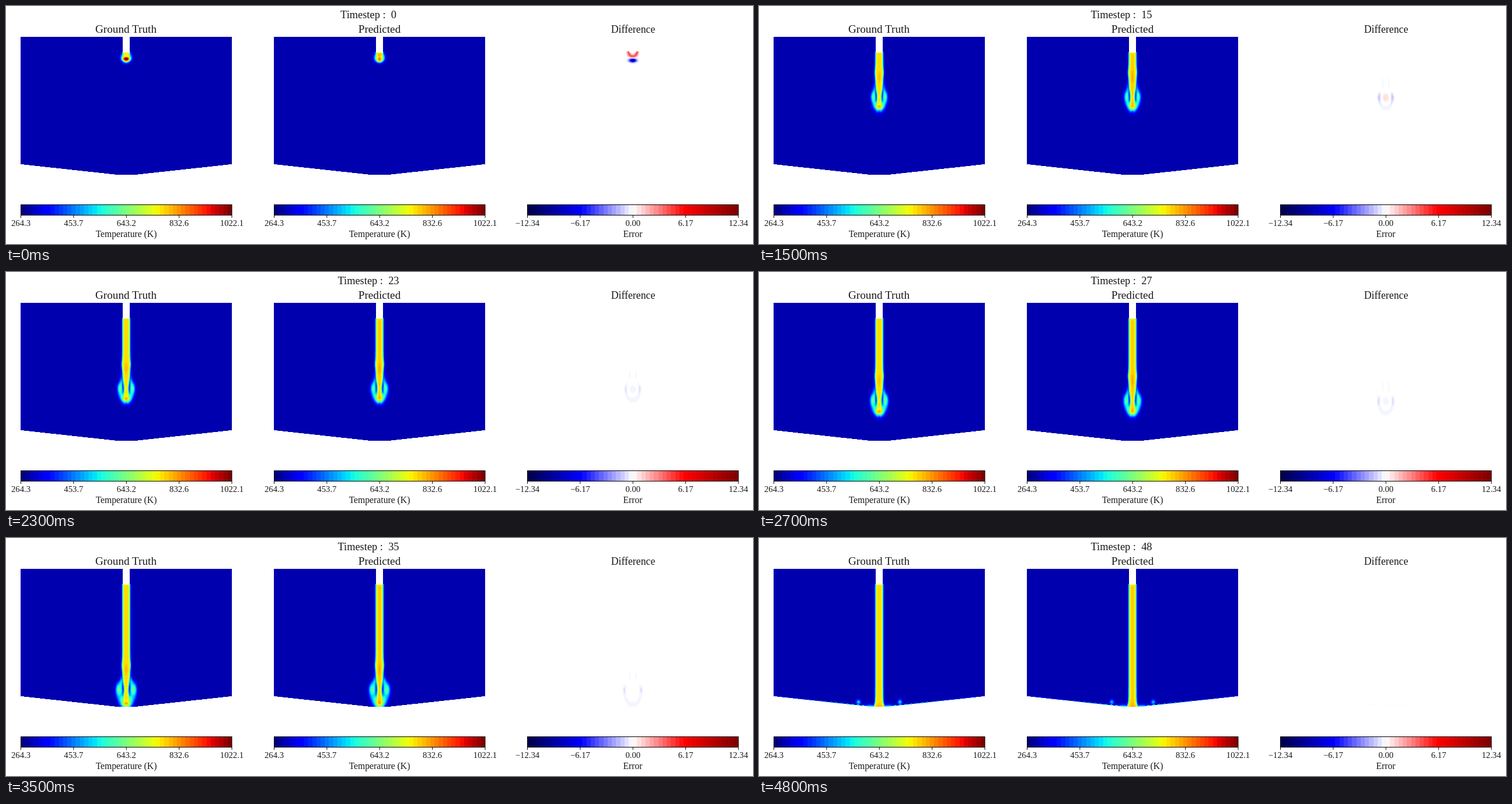
Animation, 1280 px wide and 409 px high, one loop 4.9 s. Source, as an HTML page with a canvas:

```html
<!DOCTYPE html>
<html lang="en">
<head>
<meta charset="utf-8">
<title>Jet temperature prediction</title>
<style>
  html, body { margin: 0; width: 100%; height: 100%; overflow: hidden; background: #fff; }
  canvas, svg { position: absolute; left: 0; top: 0; }
  text { font-family: "Liberation Serif", serif; text-anchor: middle; fill: #1a1a1a; }
</style>
</head>
<body>
<canvas id="stage" width="1280" height="409"></canvas>
<svg id="labels" width="1280" height="409"></svg>
<script>
const ctx = document.getElementById('stage').getContext('2d');
const labels = document.getElementById('labels');
const STEPS = 49, STEP_MS = 100, LEVELS = 50;
const TOP = 53, HALF = 181, HEIGHT = 238, AMBIENT = 0.045;

const clamp = v => Math.min(1, Math.max(0, v));
const sigmoid = v => 1 / (1 + Math.exp(-v));
const bell = (a, b = 0) => Math.exp(-a * a - b * b);
const floorAt = dx => Math.min(290, 290.5 - (dx - 6) * 19 / 174);

// Colour maps, resampled to a fixed number of levels
const jet = t => [
  Math.min((t - 0.35) / 0.31, 1 - (t - 0.89) / 0.22),
  Math.min((t - 0.125) / 0.25, (0.91 - t) / 0.27),
  Math.min(0.5 + t / 0.22, (0.65 - t) / 0.31),
];
function seismic(t) {
  if (t < 0.25) return [0, 0, 0.3 + 2.8 * t];
  if (t < 0.5) return [4 * t - 1, 4 * t - 1, 1];
  if (t < 0.75) return [1, 3 - 4 * t, 3 - 4 * t];
  return [2.5 - 2 * t, 0, 0];
}
const palette = map => Array.from({ length: LEVELS },
  (_, i) => map(i / (LEVELS - 1)).map(v => Math.round(255 * clamp(v))));
const heat = palette(jet), signed = palette(seismic);
const shade = (colors, t) => colors[Math.floor(Math.min(0.999, clamp(t)) * LEVELS)];

// Jet head over time: vortex place, radii and heat; bulb radius, upper height
// and strength; error in the core, the vortices and the rim
const NAMES = ['step', 'vx', 'vy', 'vrx', 'vry', 'vHeat', 'rx', 'up', 'bulb', 'core', 'swirl', 'rim'];
const KEYS = [
  [0, 4, 88, 4, 5, 0, 8, 9, 1, 0, 0, 0],
  [8, 10, 124, 4.5, 8, 0.3, 14, 13, 1, 0.07, -0.14, -0.02],
  [15, 10, 156, 4, 9, 0.2, 13.5, 18, 1, 0.04, -0.04, -0.02],
  [23, 10.5, 200, 4, 9, 0.2, 14.5, 18, 1, -0.019, -0.005, -0.019],
  [31, 11, 241, 4.5, 10, 0.22, 16, 20, 1, -0.018, -0.012, -0.017],
  [36, 13, 265, 5, 9, 0.2, 18, 20, 1, 0, -0.012, -0.014],
  [40, 16, 278, 5.5, 7, 0.22, 23, 18, 1, 0, 0, 0],
  [45, 28, 280, 5, 6, 0.28, 24, 14, 0, 0, 0, 0],
  [48, 35.5, 281.5, 4, 4.5, 0.3, 24, 12, 0, 0, 0, 0],
];

function poseAt(step) {
  const i = Math.max(1, KEYS.findIndex(k => k[0] >= step));
  const a = KEYS[i - 1], b = KEYS[i], f = (step - a[0]) / (b[0] - a[0]);
  const pose = {};
  NAMES.forEach((name, n) => pose[name] = a[n] + (b[n] - a[n]) * f);
  pose.front = 95.5 + 5.6 * step;
  pose.start = clamp(1 - step / 4);
  pose.impact = clamp((step - 35) / 8);
  return pose;
}

function bulbRadius(dx, y, p) {
  const below = y > p.vy;
  const notch = below ? 1.5 * (1 - p.start) * bell(dx / 2) : 0;
  return Math.hypot(dx / p.rx, (y + notch - p.vy) / (below ? p.front - p.vy : p.up));
}

function temperature(dx, y, p, predicted) {
  const above = floorAt(dx) - y;
  let t = AMBIENT;
  if (p.step > 36 && dx > 20 && above < 1.3 && floorAt(dx) % 1 < 0.55)
    t += 0.33 * p.impact * Math.exp(-(dx - 20) / 130);
  if (dx > 50) return t;

  const neck = Math.min(2.6, p.step * 0.4) * p.bulb;
  const half = 6.4 + p.bulb * bell((y - p.vy + 42) / 9) - neck * bell((y - p.vy) / 14)
    + 4 * p.impact * Math.exp(-above / 5);
  const stem = 0.625 * sigmoid((half - dx) / 0.85) * sigmoid((y - 78.5) / 0.4)
    * sigmoid((p.front - 6 - y) / 2);
  const sheath = 0.05 * sigmoid((10 - dx) / 1.5) * sigmoid((y - 108) / 5) * sigmoid((p.vy - y) / 4);

  const down = p.front - p.vy;
  const gap = 0.65 * (1 - p.start) * bell((dx - 5.5) / 2.4, (y - p.vy + 4) / 14);
  const body = p.bulb * sigmoid((1 - bulbRadius(dx, y, p)) * p.rx / 1.6);
  const cap = 0.38 * sigmoid((y - p.vy - 0.4 * down) / 2) * bell(dx / 9);
  const swirl = p.vHeat * (predicted ? 0.9 : 1) * bell((dx - p.vx) / p.vrx, (y - p.vy) / p.vry);
  const wake = 0.12 * p.bulb * (1 - p.start) * bell((dx - 8) / 3, (y - p.vy + 20) / 13);
  const wall = 0.5 * p.impact * Math.exp(-above / 2.5) * sigmoid((23 - dx) / 3);
  const head = body * ((0.25 + 0.25 * p.start) * (1 - gap) + cap) + swirl + wake;
  t += Math.max(stem, head, wall, sheath);

  t += 0.04 * p.bulb * (1 - p.start) * bell(dx / 3, (y - p.vy + 34) / 9);
  t += 0.04 * p.impact * bell(dx / 7, above / 6);
  if (predicted) {
    t += 0.022 * bell(dx / 2.5) * sigmoid((p.front - y) / 3) * sigmoid(y - 82);
    t += 0.1 * bell(dx / 5, (y - p.front + 7.5 + p.start) / 5);
  } else {
    t += (0.14 + 0.21 * p.start) * bell(dx / 6, (y - p.front + 6.5 - p.start) / 3.2);
  }
  return t;
}

function error(dx, y, p) {
  if (dx > 50) return 0;
  const above = floorAt(dx) - y;
  const ring = y > 77 ? bell((Math.hypot(dx, y - 79) - 7) / 3) : 0;
  let v = p.start * (0.17 * ring - 0.4 * bell(dx / 6, (y - 93) / 3.2));
  v += p.core * bell(dx / 5.5, (y - p.vy - 1) / 7);
  v += p.swirl * bell((dx - p.vx - 1) / 2.8, (y - p.vy - 1) / 6);
  v += p.rim * bell((bulbRadius(dx, y, p) - 0.84) / 0.17) * sigmoid((y - p.vy + 9) / 1.5);
  v += p.rim * bell((dx - 5) / 1.3, (y - p.vy + 24) / 8);
  if (p.step > 36) {
    const fade = clamp((48 - p.step) / 8);
    v += 0.04 * fade * bell((dx - p.vx - 8) / 3, (above - 2.5) / 1.6);
    v += 0.02 * fade * bell((dx - p.vx + 2) / 4, (y - p.vy + 7) / 1.4);
    if (dx < p.vx + 4 && Math.abs(above - 2) < 1 && Math.sin(dx * 0.7) > 0.75) v -= 0.015;
  }
  return v;
}

// The flow is symmetric, so each value fills a pixel on both sides of the axis
function drawPanel(left, colorAt) {
  const width = 2 * HALF;
  const image = ctx.createImageData(width, HEIGHT);
  for (let row = 0; row < HEIGHT; row++) {
    for (let i = 0; i < HALF; i++) {
      const dx = i + 0.5, y = TOP + row;
      const inNozzle = dx < 6 && y < 80;
      if (inNozzle || y >= floorAt(dx)) continue;
      const color = colorAt(dx, y);
      if (!color) continue;
      for (const col of [HALF - 1 - i, HALF + i])
        image.data.set([...color, 255], 4 * (row * width + col));
    }
  }
  ctx.putImageData(image, left, TOP);
}

function addText(content, x, y, size) {
  const node = document.createElementNS('http://www.w3.org/2000/svg', 'text');
  node.setAttribute('x', x);
  node.setAttribute('y', y);
  node.setAttribute('font-size', size);
  node.textContent = content;
  labels.append(node);
  return node;
}

function drawBar(left, colors, ticks, caption) {
  const edge = i => Math.round(left + i * 361.5 / LEVELS);
  colors.forEach((c, i) => {
    ctx.fillStyle = `rgb(${c})`;
    ctx.fillRect(edge(i), 341, edge(i + 1) - edge(i), 19);
  });
  ctx.strokeStyle = '#000';
  ctx.lineWidth = 1;
  ctx.strokeRect(left, 341.5, 361.5, 18);
  ticks.forEach((label, i) => {
    const x = left + i * 361.5 / 4;
    ctx.beginPath();
    ctx.moveTo(x, 360);
    ctx.lineTo(x, 364);
    ctx.stroke();
    addText(label, x, 378, 14.7);
  });
  addText(caption, left + 180.5, 396.5, 15.7);
}

const KELVIN = ['264.3', '453.7', '643.2', '832.6', '1022.1'];
drawBar(25.5, heat, KELVIN, 'Temperature (K)');
drawBar(459.5, heat, KELVIN, 'Temperature (K)');
drawBar(893.5, signed, ['−12.34', '−6.17', '0.00', '6.17', '12.34'], 'Error');
addText('Ground Truth', 205.5, 46, 19.2);
addText('Predicted', 640, 46, 19.2);
addText('Difference', 1074.5, 46, 17.8);
const clock = addText('', 621, 21, 18.4);

let shown = -1;
function render() {
  const step = Math.floor(performance.now() / STEP_MS) % STEPS;
  if (step !== shown) {
    shown = step;
    const pose = poseAt(step);
    clock.textContent = `Timestep :\u00a0 ${step}`;
    drawPanel(25, (dx, y) => shade(heat, temperature(dx, y, pose, false)));
    drawPanel(459, (dx, y) => shade(heat, temperature(dx, y, pose, true)));
    drawPanel(893, (dx, y) => {
      const v = error(dx, y, pose);
      return Math.abs(v) > 0.008 ? shade(signed, 0.5 + v) : null;
    });
  }
  requestAnimationFrame(render);
}
render();
</script>
</body>
</html>
```
